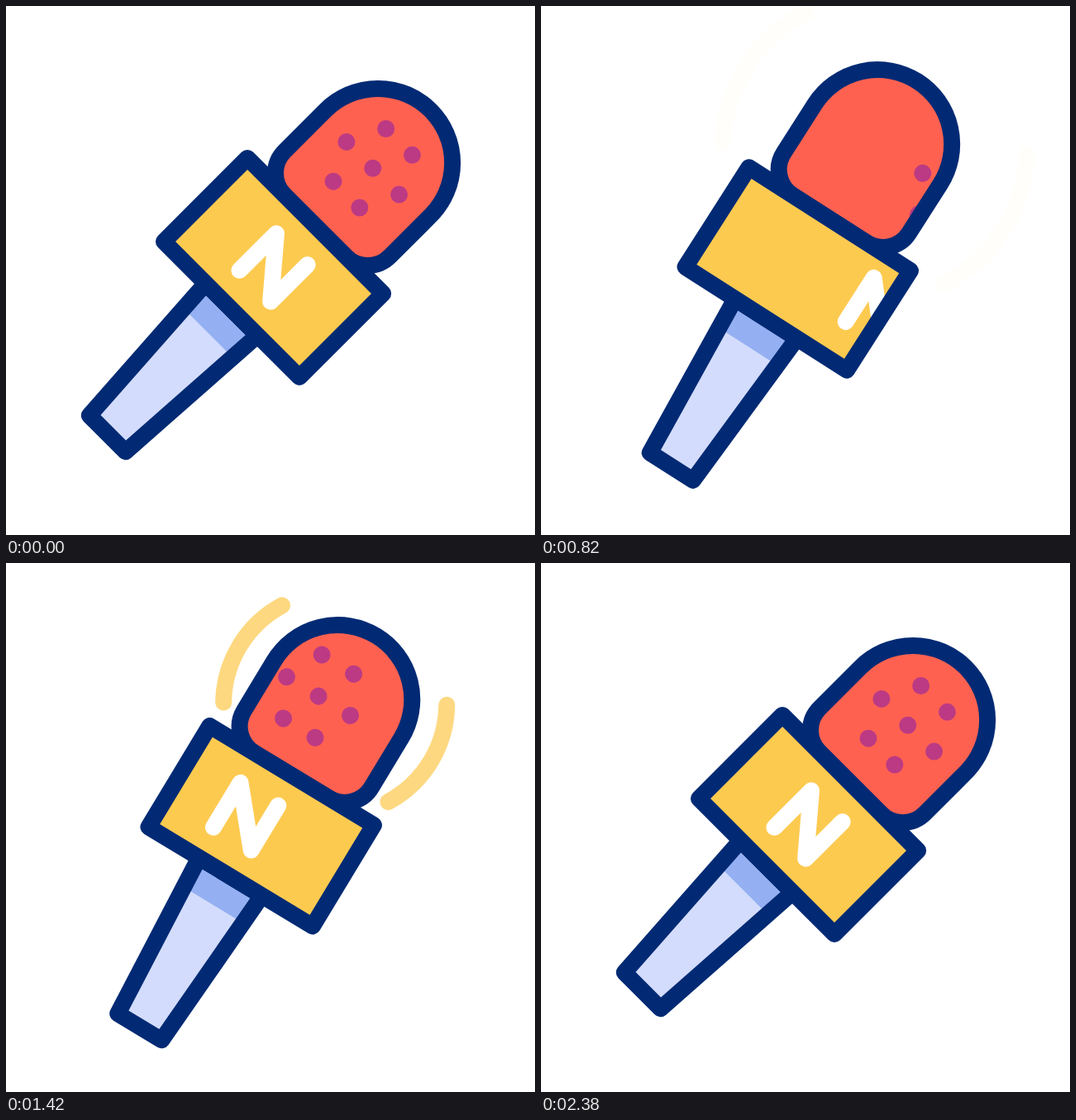
Animation of 640 by 640 pixels, one loop 2.4 s. Source, as an HTML page:

```html
<!DOCTYPE html>
<html lang="en">
<head>
<meta charset="utf-8">
<title>Microphone</title>
<style>
  html, body { margin: 0; width: 100%; height: 100%; overflow: hidden; background: #fff; }
  svg { display: block; width: 100%; height: 100%; }
  .line { fill: none; stroke: #022a74; stroke-width: 20; stroke-linejoin: round; }
  .wave { fill: none; stroke: #fdca50; stroke-width: 20; stroke-linecap: round; }
</style>
</head>
<body>
<svg viewBox="0 0 640 640">
  <defs>
    <path id="head" d="M-90-184A90 90 0 0 1 90-184V-114A37.5 37.5 0 0 1 52.5-76.5H-52.5A37.5 37.5 0 0 1-90-114Z"/>
    <path id="box" d="M-116-76.5H116V66.5H-116Z"/>
    <path id="handle" d="M-44.4 66.5H44.4L31 279H-31Z"/>
    <clipPath id="inHead"><use href="#head"/></clipPath>
    <clipPath id="inBox"><use href="#box"/></clipPath>
    <clipPath id="inHandle"><use href="#handle"/></clipPath>
  </defs>
  <!-- the microphone stands upright here; the group tilts it -->
  <g id="mic">
    <path class="wave"/>
    <path class="wave"/>
    <use href="#handle" fill="#d3dcfc"/>
    <path d="M-60 60H60V106.8H-60Z" fill="#94b0f2" clip-path="url(#inHandle)"/>
    <use href="#handle" class="line"/>
    <use href="#head" fill="#ff6150"/>
    <g clip-path="url(#inHead)"><g id="dots" class="slide" fill="#bc3a84"></g></g>
    <use href="#head" class="line"/>
    <use href="#box" fill="#fdca50"/>
    <g clip-path="url(#inBox)">
      <path class="slide" d="M-26.7 26.5V-36.5L26.7 26.5V-36.5" fill="none" stroke="#fff"
        stroke-width="20" stroke-linecap="round" stroke-linejoin="round"/>
    </g>
    <use href="#box" class="line"/>
  </g>
</svg>
<script>
const LOOP = 2400, TRAVEL = 156;
const mic = document.getElementById('mic');
const slides = document.querySelectorAll('.slide');
const waves = document.querySelectorAll('.wave');

const clamp = x => Math.min(1, Math.max(0, x));
const smooth = x => (x = clamp(x), x * x * (3 - 2 * x));
const cubic = x => x < 0.5 ? 4 * x ** 3 : 1 - 4 * (1 - x) ** 3;

// hexagon of dots around a middle one
document.getElementById('dots').innerHTML =
  [[0, 0], [-45, 0], [45, 0], [-22.5, -45], [22.5, -45], [-22.5, 45], [22.5, 45]]
    .map(([x, y]) => `<circle cx="${x}" cy="${y - 175}" r="10.5"/>`).join('');

function drawTilt(t) {
  const p = cubic(1 - Math.abs(t / 1200 - 1));
  const shift = p ** 1.4;
  mic.setAttribute('transform',
    `translate(${320 - 14.4 * shift} ${320 + 2.6 * shift}) rotate(${45 - 14.2 * p})`);
}

// leaves on the right, comes back in from the left
function drawSlide(t) {
  const x = t < 980
    ? TRAVEL * smooth((t - 538) / 442)
    : -TRAVEL * smooth((1557 - t) / 577);
  const y = x > 0 ? -0.08 * x : 0.015 * x;
  slides.forEach(s => s.setAttribute('transform', `translate(${x} ${y})`));
}

// a pair of arcs closes in on the head
function drawWave(wave, age) {
  const s = age / 100;
  const r = Math.max(80, 190 - 11.3 * s - 0.55 * s * s);
  const x = r * 0.862, top = -178 - r * 0.507, bottom = -178 + r * 0.507;
  wave.setAttribute('d', `M${x} ${top}A${r} ${r} 0 0 1 ${x} ${bottom}` +
    `M${-x} ${top}A${r} ${r} 0 0 0 ${-x} ${bottom}`);
  wave.setAttribute('opacity', age < 0 ? 0 : smooth(age / 620) * clamp((620 - age) / 120));
}

function frame() {
  const t = performance.now() % LOOP;
  drawTilt(t);
  drawSlide(t);
  waves.forEach((wave, i) => drawWave(wave, t - 770 - 245 * i));
  requestAnimationFrame(frame);
}
frame();
</script>
</body>
</html>
```
